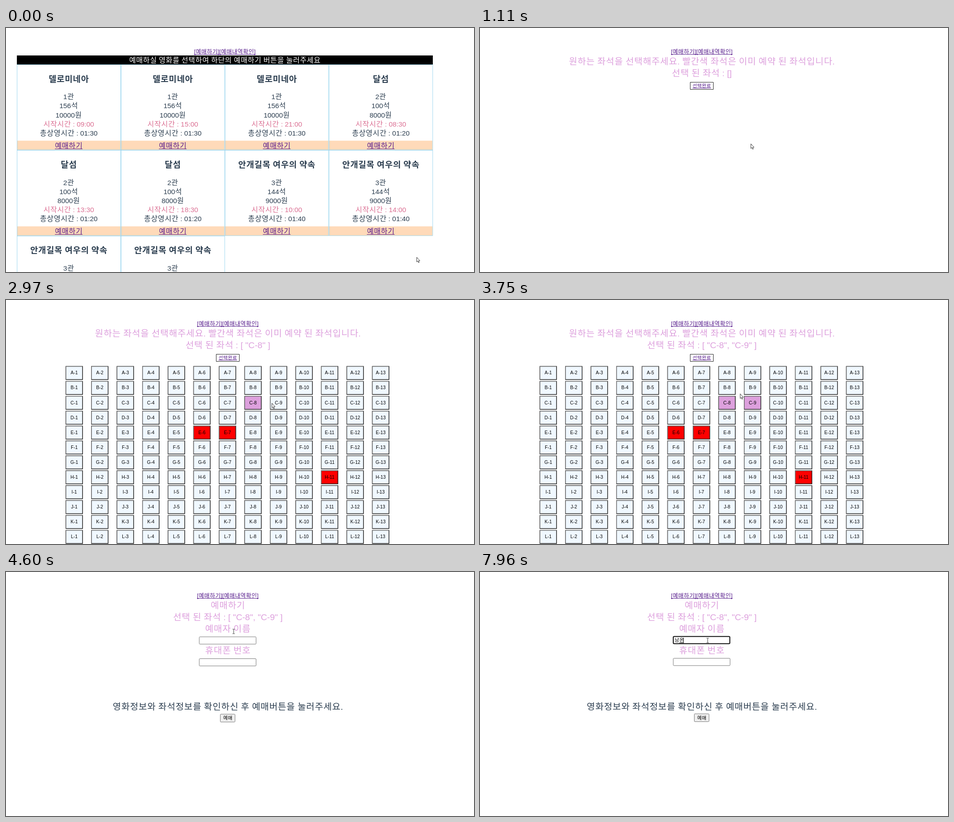
Write an HTML page with a canvas that moves like this. It is 1034 by 542 pixels and loops after 8 s.

```html
<!DOCTYPE html>
<html lang="ko">
<head>
<meta charset="utf-8">
<title>영화 예매</title>
<style>
html, body { margin: 0; width: 100%; height: 100%; overflow: hidden; background: #fff; }
canvas { display: block; width: 1034px; height: 542px; }
</style>
</head>
<body>
<canvas id="stage" width="1034" height="542"></canvas>
<script>
const ctx = document.getElementById('stage').getContext('2d');
const LOOP = 8000;
const INK = '#2c3e50', VISITED = '#551a8b', PLUM = '#dda0dd';
const BODY = 15.3, HEAD = 19.1, NAV = 12.24, SMALL = 10.2;
const CENTER = 490;

const FILMS = [
  { title: '델로미네아', info: ['1관', '156석', '10000원'], span: '01:30', starts: ['09:00', '15:00', '21:00'] },
  { title: '달섬', info: ['2관', '100석', '8000원'], span: '01:20', starts: ['08:30', '13:30', '18:30'] },
  { title: '안개길목 여우의 약속', info: ['3관', '144석', '9000원'], span: '01:40', starts: ['10:00', '14:00', '18:00', '22:00'] }
];
const SHOWS = FILMS.flatMap(film => film.starts.map(start => ({ ...film, start })));
const TAKEN = ['E-6', 'E-7', 'H-11'];

// Bursts of pointer movement: first step, last step, number of steps
const BURSTS = [[70, 540, 7], [1350, 1730, 6], [1900, 2440, 8], [2890, 3280, 6], [3680, 4370, 10], [4980, 5210, 4]];
// Pointer keys: time, x, y
const PATH = [
  [0, 907, 509], [310, 715, 350], [540, 598, 257],
  [1274, 598, 257], [1500, 560, 246], [1730, 526, 236],
  [1823, 526, 236], [2054, 548, 254], [2210, 548, 258], [2440, 546, 229],
  [2812, 546, 229], [2968, 587, 229], [3050, 593, 229],
  [3603, 593, 229], [4000, 545, 175], [4370, 503, 131],
  [4903, 503, 132], [5210, 503, 152]
];
const CLICKS = [[940, 1020], [2660, 2740], [3200, 3280], [4520, 4600], [5360, 5440]];
const TYPING = [[6560, 'ㄴ'], [6790, '나'], [7020, '남'], [7650, '남ㅇ'], [7730, '남오'], [7960, '남온']];
const CARET_OFF = [[5920, 6390], [7500, 7650]];

const within = (ranges, t) => ranges.some(([a, b]) => t >= a && t < b);

// Hangul sits in full-em cells, everything else in the Latin face
function runs(str, size, bold) {
  const scale = 1.04;
  return str.match(/[ㄱ-ㅎ가-힣]+|[^ㄱ-ㅎ가-힣]+/g).map(part => {
    const hangul = /[ㄱ-ㅎ가-힣]/.test(part);
    const font = hangul
      ? `${bold ? 700 : 350} ${size * scale}px "Noto Sans CJK KR", "Noto Sans CJK", sans-serif`
      : `${bold ? 700 : 400} ${size}px "Liberation Sans", Arial, sans-serif`;
    const gap = hangul ? size * (1 - 0.92 * scale) : 0;
    ctx.font = font;
    ctx.letterSpacing = gap + 'px';
    return { part, font, gap, width: ctx.measureText(part).width };
  });
}

function text(str, x, y, size, color, { bold, underline, left } = {}) {
  const parts = runs(str, size, bold);
  const width = parts.reduce((sum, p) => sum + p.width, 0);
  const start = left ? x : x - width / 2;
  const base = y + size * 0.37;
  ctx.fillStyle = color;
  let pen = start;
  for (const p of parts) {
    ctx.font = p.font;
    ctx.letterSpacing = p.gap + 'px';
    ctx.fillText(p.part, pen + p.gap / 2, base);
    pen += p.width;
  }
  if (underline) ctx.fillRect(start, Math.round(base + size * 0.1), width, 1);
}

function box(x, y, w, h, fill, stroke, line = 1, radius = 0) {
  ctx.beginPath();
  ctx.roundRect(x + line / 2, y + line / 2, w - line, h - line, radius);
  ctx.fillStyle = fill;
  ctx.fill();
  ctx.strokeStyle = stroke;
  ctx.lineWidth = line;
  ctx.stroke();
}

function nav(x) {
  text('[예매하기][예매내역확인]', x, 52.5, NAV, VISITED, { underline: true });
}

function filmPage(t) {
  nav(483.5);
  ctx.fillStyle = '#000';
  ctx.fillRect(24, 61, 919, 20);
  text('예매하실 영화를 선택하여 하단의 예매하기 버튼을 눌러주세요', 483.5, 71, BODY, '#fff');
  const w = 229.8, h = 190.3;
  SHOWS.forEach((show, i) => {
    const x = 24 + (i % 4) * w, y = 81 + Math.floor(i / 4) * h;
    if (i > 9) return;
    const mid = x + w / 2 - 0.4;
    ctx.fillStyle = '#ffdab9';
    ctx.fillRect(x + 0.5, y + 169.3, w - 1.5, 20.5);
    ctx.strokeStyle = '#87ceeb';
    ctx.lineWidth = 0.8;
    ctx.strokeRect(x + 0.4, y + 0.4, w - 0.8, h - 0.8);
    text(show.title, mid, y + 32, BODY * 1.17, INK, { bold: true });
    const lines = [...show.info, '시작시간 : ' + show.start, '총상영시간 : ' + show.span];
    lines.forEach((line, n) => text(line, mid, y + 71.6 + n * 20.2, BODY, n === 3 ? '#db7093' : INK));
    const active = i === 2 && t >= 940;
    text('예매하기', mid, y + 180, BODY, active ? '#f00' : VISITED, { underline: true });
  });
}

function seat(row, col, picked) {
  const name = 'ABCDEFGHIJKL'[row] + '-' + (col + 1);
  const x = 131.7 + col * 56.42, y = 146.8 + row * 33.1, w = 38.2, h = 30.6, b = 1.5;
  ctx.fillStyle = '#222';
  ctx.fillRect(x, y, w, h);
  ctx.fillStyle = '#6b6b6b';
  ctx.beginPath();
  ctx.moveTo(x, y);
  ctx.lineTo(x + w, y);
  ctx.lineTo(x + w - b, y + b);
  ctx.lineTo(x + b, y + h - b);
  ctx.lineTo(x, y + h);
  ctx.fill();
  ctx.fillStyle = TAKEN.includes(name) ? '#f00' : picked.includes(name) ? PLUM : '#f0f8ff';
  ctx.fillRect(x + b, y + b, w - 2 * b, h - 2 * b);
  text(name, x + w / 2, y + h / 2 - 0.5, SMALL, '#000');
}

function pickedLine(picked) {
  const list = picked.length ? `[ ${picked.map(s => `"${s}"`).join(', ')} ]` : '[]';
  text('선택 된 좌석 : ' + list, CENTER, 100.3, HEAD, PLUM);
}

function seatPage(t, picked) {
  nav(CENTER);
  text('원하는 좌석을 선택해주세요. 빨간색 좌석은 이미 예약 된 좌석입니다.', CENTER, 74.3, HEAD, PLUM);
  pickedLine(picked);
  box(464, 120, 52, 17, '#fff', '#222');
  text('선택완료', CENTER, 128.5, SMALL, t >= 4520 ? '#f00' : VISITED, { underline: true });
  if (t < 1180) return;
  for (let row = 0; row < 12; row++)
    for (let col = 0; col < 13; col++) seat(row, col, picked);
}

function nameField(t, y) {
  const focused = t >= 5360;
  if (focused) box(426, y - 0.5, 127, 18, '#fff', '#101010', 2, 2);
  else box(426.5, y, 126.5, 17.2, '#fff', t >= 5130 ? '#4f4f4f' : '#767676', 1, 1.5);
  if (!focused) return;
  const typed = TYPING.filter(([at]) => t >= at).pop();
  const value = typed ? typed[1] : '';
  if (value) {
    text(value, 430, y + 8.6, SMALL, '#000', { left: true });
    ctx.fillRect(430 + (value.length - 1) * SMALL, y + 14.2, SMALL - 0.5, 0.8);
  }
  if (!within(CARET_OFF, t)) {
    ctx.fillStyle = '#000';
    ctx.fillRect(value ? 429 + Math.round(value.length * SMALL) : 429, 146, 1, 12);
  }
}

function formPage(t, picked) {
  const lift = t >= 6560 ? 0.8 : 0;
  nav(CENTER);
  text('예매하기', CENTER, 74.3, HEAD, PLUM);
  pickedLine(picked);
  text('예매자 이름', CENTER, 126, HEAD, PLUM);
  nameField(t, 143.5 - lift);
  text('휴대폰 번호', CENTER, 174.3 - lift, HEAD, PLUM);
  box(426.5, 192 - lift, 126.5, 17.2, '#fff', '#767676', 1, 1.5);
  text('영화정보와 좌석정보를 확인하신 후 예매버튼을 눌러주세요.', CENTER, 299.3 - lift, HEAD, INK);
  box(473, 315.3 - lift, 33.5, 18.4, '#efefef', '#767676', 1, 1.5);
  text('예매', CENTER, 324.7 - lift, SMALL, '#000');
}

// Hold the pointer between its discrete steps
function snap(t) {
  const burst = BURSTS.filter(([from]) => t >= from).pop();
  if (!burst) return 0;
  const [from, to, n] = burst, step = (to - from) / (n - 1);
  return Math.min(to, from + Math.floor((t - from) / step + 0.1) * step);
}

function pointerAt(t) {
  if (t >= 4600 && t < 4980) return [503, 132];
  const q = snap(t);
  const i = PATH.findIndex(([at]) => at >= q - 0.01);
  if (i < 1) return PATH[0].slice(1);
  const [t0, x0, y0] = PATH[i - 1], [t1, x1, y1] = PATH[i];
  const k = Math.min(1, (q - t0) / (t1 - t0));
  return [x0 + (x1 - x0) * k, y0 + (y1 - y0) * k];
}

const ARROW = new Path2D('M.5 .3V10.6L2.8 8.5L4.4 12.3L6 11.6L4.4 8H7.5Z');
const HAND = new Path2D('M-1.2 1Q0 -.6 1.2 1V5Q2.4 4.3 3 5.5Q4.3 5 4.8 6.2Q6.3 6 6.3 7.4V10.2Q6 12 5 13V14.5H-.3V13L-3.6 8.8Q-3.6 7.2 -2.3 7.6L-1.2 8.8Z');
const BEAM = new Path2D('M-2.5 -5H-.6L0 -4.5L.6 -5H2.5M0 -4.5V4.5M-2.5 5H-.6L0 4.5L.6 5H2.5');

function pointer(t) {
  const [x, y] = pointerAt(t);
  if (within(CLICKS, t)) {
    ctx.fillStyle = 'rgba(255, 232, 0, 0.6)';
    ctx.beginPath();
    ctx.arc(x + 1, y - 0.5, 8.5, 0, Math.PI * 2);
    ctx.fill();
  }
  ctx.save();
  ctx.translate(x, y);
  ctx.strokeStyle = '#222';
  ctx.lineWidth = 0.9;
  ctx.fillStyle = '#fff';
  if (t >= 4600) {
    ctx.stroke(BEAM);
  } else {
    const hand = (t >= 540 && t < 1110) || t >= 4370;
    const shape = hand ? HAND : ARROW;
    ctx.fill(shape);
    ctx.stroke(shape);
  }
  ctx.restore();
}

function draw(t) {
  ctx.fillStyle = '#fff';
  ctx.fillRect(0, 0, 1034, 542);
  const picked = ['C-8', 'C-9'].slice(0, (t >= 2740) + (t >= 3280));
  if (t < 1020) filmPage(t);
  else if (t < 4600) seatPage(t, picked);
  else formPage(t, picked);
  pointer(t);
}

const begin = performance.now();
function frame() {
  draw((performance.now() - begin) % LOOP);
  requestAnimationFrame(frame);
}
frame();
</script>
</body>
</html>
```
